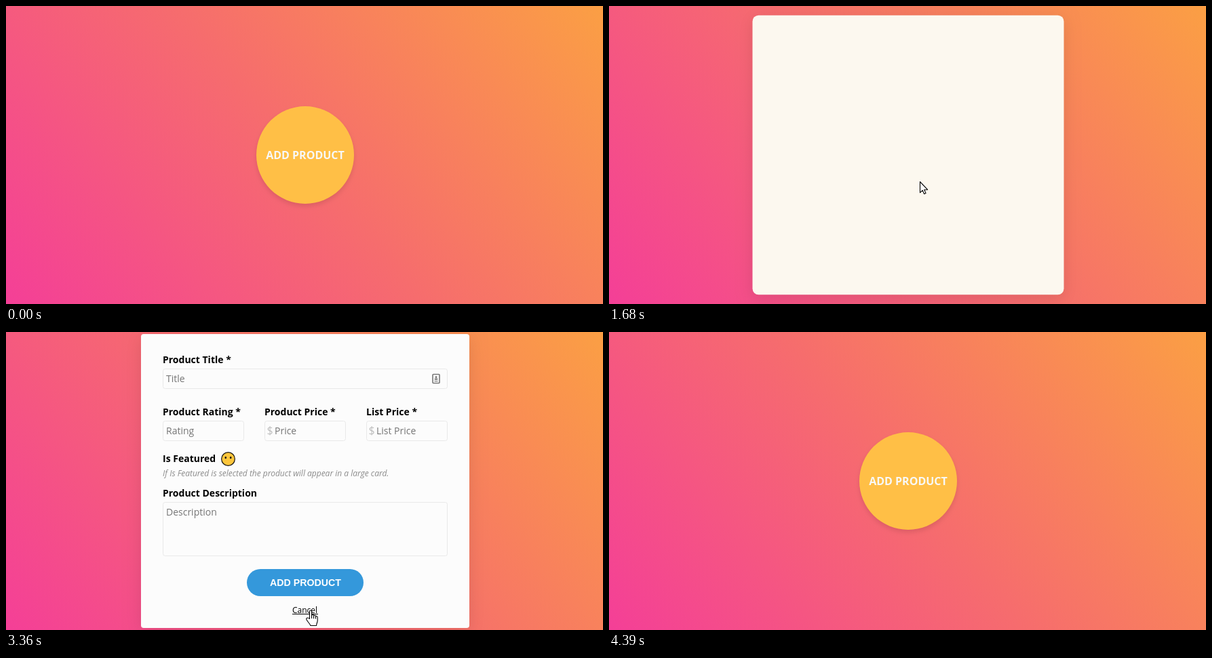
An HTML page with a canvas for the animation above (5.17 s loop, 880 by 440 pixels).

```html
<!DOCTYPE html>
<html lang="en">
<head>
<meta charset="utf-8">
<title>Add product</title>
<style>
html, body { margin: 0; width: 100%; height: 100%; overflow: hidden; }
canvas { display: block; }
</style>
</head>
<body>
<canvas id="stage" width="880" height="440"></canvas>
<script>
const ctx = document.getElementById('stage').getContext('2d');
const LOOP = 5170;
const SANS = '"Open Sans", sans-serif';
const ARIAL = '"Liberation Sans", Arial, sans-serif';

// Motion happens in bursts, each sampled at its own rate: start, end, step.
const BURSTS = [[770, 1180, 58.5], [1520, 2030, 53.3], [2680, 3180, 55.5], [3240, 3360, 60], [3950, 4390, 60]];

// Cursor path: time, x, y
const PATH = [
  [770, 527, 434], [1180, 458, 260],
  [1680, 458, 259], [1940, 864, 418], [2030, 850, 411],
  [2680, 850, 411], [3180, 468, 410], [3240, 462, 411], [3360, 448, 411],
  [4070, 448, 411], [4390, 462, 450]
];

const ARROW = new Path2D('M.5.5V16.6L4.2 13.1L6.6 18.5L9 17.4L6.7 12.2H11.6Z');
const HAND = new Path2D('M-.5 12.5V1.6C-.5-.6 2.6-.6 2.6 1.6V8C2.6 5.8 5.6 5.9 5.6 8V8.6C5.6 6.7 8.5 6.8 8.5 8.9V9.6' +
  'C8.5 8 11.2 8 11.2 10.2V15C11.2 17.5 9.8 18.8 9.5 22.5H.8C.3 20-2.8 17.5-4.5 14.5C-6.8 11-3 9.8-.5 12.5Z');
const FINGERS = new Path2D('M2.6 8v4M5.6 8.6v3.6M8.5 9.6v2.8');

const mix = (a, b, k) => a + (b - a) * k;
const clamp = v => Math.min(1, Math.max(0, v));
const smooth = k => k * k * (3 - 2 * k);

// cubic-bezier(.25, .1, .25, 1)
function ease(x) {
  if (x <= 0 || x >= 1) return clamp(x);
  const curve = (s, a, b) => 3 * (1 - s) * (1 - s) * s * a + 3 * (1 - s) * s * s * b + s * s * s;
  let lo = 0, hi = 1;
  for (let i = 0; i < 24; i++) {
    const mid = (lo + hi) / 2;
    if (curve(mid, .25, .25) < x) lo = mid; else hi = mid;
  }
  return curve(lo, .1, 1);
}

function snap(t) {
  for (const [start, end, step] of BURSTS) {
    if (t >= start && t < end) return start + Math.floor((t - start) / step) * step;
  }
  return t;
}

function openness(t) {
  if (t < 1520) return 0;
  if (t < 3950) return ease((t - 1479) / 300);
  return 1 - ease((t - 3917) / 300);
}

function cursorAt(t) {
  if (t < PATH[0][0] || t >= 4390) return null;
  const i = PATH.findIndex(p => p[0] > t);
  const [t0, x0, y0] = PATH[i - 1], [t1, x1, y1] = PATH[i];
  const k = smooth((t - t0) / (t1 - t0));
  return { x: mix(x0, x1, k), y: mix(y0, y1, k) };
}

function text(str, x, y, font, color, align = 'left') {
  ctx.font = font;
  ctx.fillStyle = color;
  ctx.textAlign = align;
  ctx.fillText(str, x, y);
}

function rounded(x, y, w, h, r) {
  ctx.beginPath();
  ctx.roundRect(x, y, w, h, r);
}

function field(x, y, w, h, hint, money) {
  rounded(x + .5, y + .5, w - 1, h - 1, 3);
  ctx.lineWidth = 1;
  ctx.strokeStyle = '#e9e9e9';
  ctx.stroke();
  if (money) text('$', x + 3.5, y + 20, `16px ${SANS}`, '#bdbdbd');
  text(hint, x + (money ? 15 : 5), y + 20, `14px ${SANS}`, '#757575');
}

function label(str, x, y) {
  text(str, x, y, `bold 14px ${SANS}`, '#000');
}

function disc(x, y, rx, ry, color) {
  ctx.beginPath();
  ctx.ellipse(x, y, rx, ry, 0, 0, 2 * Math.PI);
  ctx.fillStyle = color;
  ctx.fill();
}

function face(x, y) {
  disc(x, y, 10.5, 10.5, '#1d1a16');
  disc(x, y, 9.2, 9.2, '#fdc63c');
  disc(x - 3.7, y - 2, 1.3, 1.8, '#1d1a16');
  disc(x + 3.7, y - 2, 1.3, 1.8, '#1d1a16');
}

function contactIcon(x, y) {
  ctx.lineWidth = 1.6;
  ctx.strokeStyle = '#777';
  rounded(x, y, 10, 13, 1);
  ctx.stroke();
  disc(x + 5, y + 4, 1.4, 1.5, '#777');
  ctx.fillRect(x + 2.8, y + 6, 4.4, 2.2);
  ctx.fillRect(x + 2.5, y + 9.6, 5, 1.1);
}

function drawForm(alpha, hover) {
  ctx.globalAlpha = alpha;
  label('Product Title *', 231, 46);
  field(231, 54, 420, 30, 'Title');
  contactIcon(629, 62.5);
  label('Product Rating *', 231, 123);
  field(231, 131, 120, 30, 'Rating');
  label('Product Price *', 381, 123);
  field(381, 131, 120, 30, 'Price', true);
  label('List Price *', 531, 123);
  field(531, 131, 120, 30, 'List Price', true);
  label('Is Featured', 231, 192);
  face(327.5, 187.5);
  text('If Is Featured is selected the product will appear in a large card.', 231, 213, `italic 12px ${SANS}`, '#8c8c8c');
  label('Product Description', 231, 243);
  field(231, 251, 420, 80, 'Description');
  rounded(355, 350, 172, 40, 20);
  ctx.fillStyle = '#3498db';
  ctx.fill();
  text('ADD PRODUCT', 441.5, 375, `bold 14.2px ${ARIAL}`, '#fff', 'center');
  text('Cancel', 422, 415, `12px ${SANS}`, '#000');
  if (hover) ctx.fillRect(422, 416, 38, 1);
  ctx.globalAlpha = 1;
}

function drawCursor(x, y, hand) {
  ctx.save();
  ctx.translate(x, y);
  ctx.lineWidth = 1.1;
  ctx.lineJoin = 'round';
  ctx.fillStyle = '#fff';
  ctx.strokeStyle = '#000';
  const shape = hand ? HAND : ARROW;
  ctx.fill(shape);
  ctx.stroke(shape);
  if (hand) ctx.stroke(FINGERS);
  ctx.restore();
}

// Gradient line from the bottom left, running 1.2 across for each 1 up.
const reach = (1.2 * 880 + 440) / (1.2 * 1.2 + 1);
const backdrop = ctx.createLinearGradient(0, 440, 1.2 * reach, 440 - reach);
backdrop.addColorStop(0, '#f43f97');
backdrop.addColorStop(.5, '#f66d6d');
backdrop.addColorStop(1, '#fb9f44');

function drawCard(k) {
  const w = mix(144, 484, k), h = mix(144, 434, k);
  const top = 220 - h / 2;
  const rgb = [[255, 252], [191, 252], [70, 252]].map(([a, b]) => Math.round(mix(a, b, k)));
  ctx.save();
  ctx.shadowColor = 'rgba(0,0,0,.1)';
  ctx.shadowOffsetY = mix(4, 5, k);
  ctx.shadowBlur = mix(6, 24, k);
  ctx.fillStyle = `rgb(${rgb})`;
  rounded(441 - w / 2, top, w, h, mix(72, 4, k));
  ctx.fill();
  ctx.restore();
  return top;
}

function draw(time) {
  const t = snap(time);
  const k = openness(t);
  const cursor = cursorAt(t);
  ctx.fillStyle = backdrop;
  ctx.fillRect(0, 0, 880, 440);

  const top = drawCard(k);
  const formOpen = t >= 1520 && t < 3950;
  const overCancel = formOpen && t > 2680 && cursor.x <= 460;
  if (formOpen) {
    const alpha = clamp((t - 1750) / 100);
    if (alpha) drawForm(alpha, overCancel);
  } else {
    text('ADD PRODUCT', 441, top + 78 + 16 * k, `bold 16px ${SANS}`, '#f8f8f8', 'center');
  }

  if (cursor) {
    const overCircle = t < 1600 && Math.hypot(cursor.x - 441, cursor.y - 220) < 72;
    const overCard = t >= 3950 && cursor.y < 440 - top;
    drawCursor(cursor.x, cursor.y, overCircle || overCancel || overCard);
  }
}

const begin = performance.now();
function tick() {
  draw((performance.now() - begin) % LOOP);
  requestAnimationFrame(tick);
}
tick();
</script>
</body>
</html>
```
